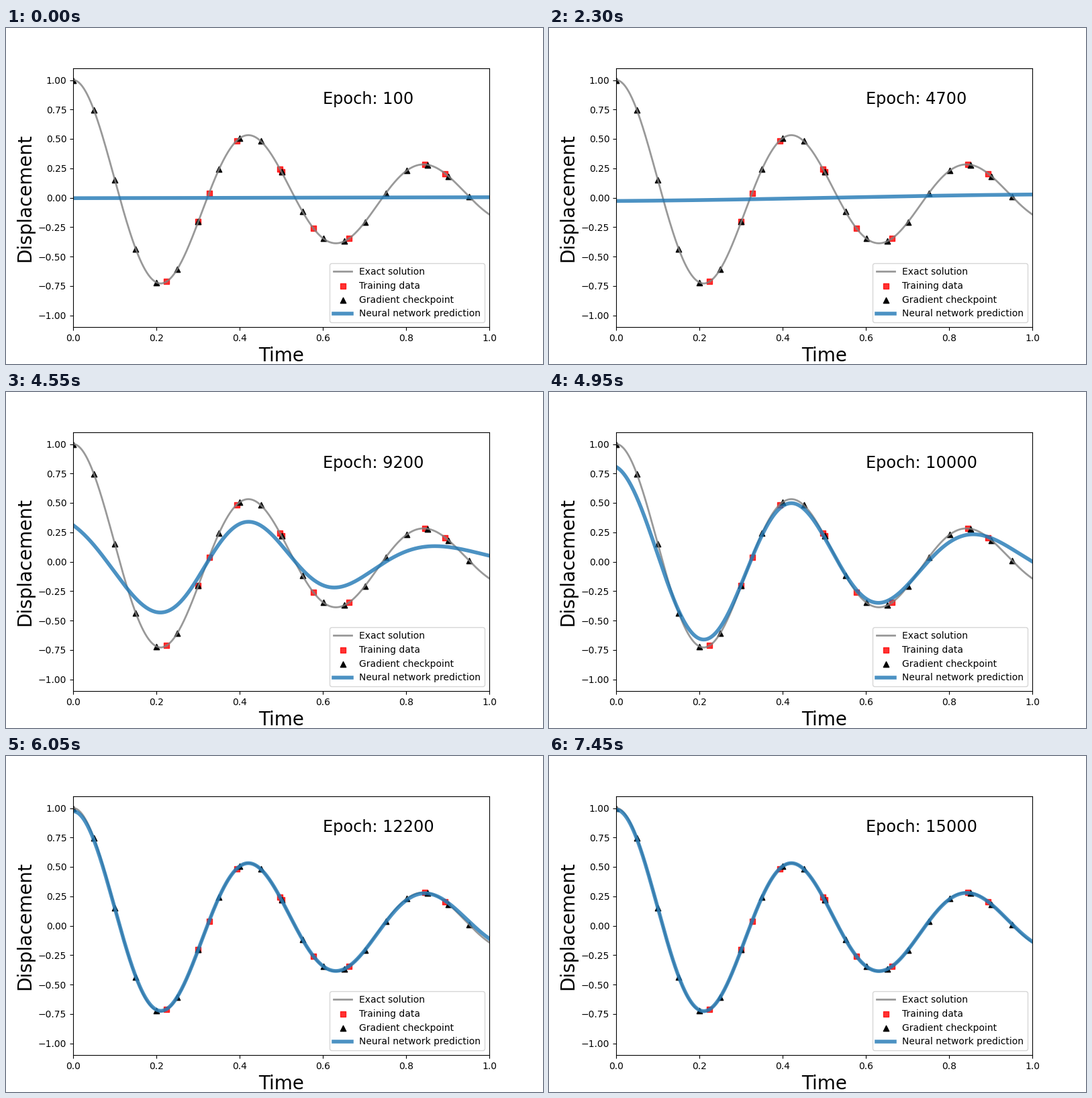
A matplotlib script that plays this animation: 800x500 px, repeating every 8000 ms.

```python
import numpy as np
import matplotlib.pyplot as plt
from matplotlib.animation import FuncAnimation

FRAMES, INTERVAL = 160, 50
LAST_EPOCH = 15000
DAMPING, OMEGA0 = 1.5, 15


def oscillator(t):
    """Underdamped oscillator released from rest at 1."""
    omega = np.sqrt(OMEGA0**2 - DAMPING**2)
    phase = np.arctan(-DAMPING / omega)
    return np.exp(-DAMPING * t) * np.cos(phase + omega * t) / np.cos(phase)


x = np.linspace(0, 1, 500)
exact = oscillator(x)
left_end = np.clip(1 - x / .3, 0, 1) ** 2
right_end = np.clip((x - .6) / .4, 0, 1) ** 2


def early_fit(epoch):
    """Slightly tilted line that slowly bends into half a wave."""
    bend = min(epoch / 7400, 1) ** 4
    height = .0305 * (1 - .17 * bend) * (1 - np.exp(-epoch / 600))
    return height * np.sin((2 + 2.4 * bend) * (x - .53 + .07 * bend))


def wave_fit(epoch):
    """Oscillation learned from the middle outwards, with both ends off in phase."""
    since = max(epoch, 8600) - 9200
    lead = .055 * np.exp(-since / 600)
    lag = .08 * np.exp(-since / 1450)
    falloff = 2 * np.exp(-since / 600) + .26 * np.exp(-since / 5000)
    return (oscillator(x + lead * left_end - lag * right_end)
            / (1 + falloff * (x - .42) ** 2))


def prediction(epoch):
    learned = 1 / (1 + np.exp((8980 - epoch) / 380))
    return (1 - learned) * early_fit(epoch) + learned * wave_fit(epoch)


plt.rcParams["font.family"] = "DejaVu Sans"
fig, ax = plt.subplots(figsize=(8, 5), dpi=100)

train = [112, 150, 163, 196, 248, 250, 288, 331, 422, 446]
ax.plot(x, exact, color="grey", lw=2, alpha=.8, label="Exact solution")
ax.scatter(x[train], exact[train], color="red", marker="s", alpha=.8,
           label="Training data")
ax.scatter(x[::25], exact[::25], color="black", marker="^",
           label="Gradient checkpoint")
line, = ax.plot(x, prediction(100), color="tab:blue", lw=4, alpha=.8,
                label="Neural network prediction")
label = ax.text(.6, .8, "", fontsize="xx-large")

ax.set(xlim=(0, 1), ylim=(-1.1, 1.1))
ax.set_xlabel("Time", fontsize=20)
ax.set_ylabel("Displacement", fontsize=20)
ax.legend(loc="lower right")


def update(i):
    epoch = min(100 * (i + 1), LAST_EPOCH)
    line.set_ydata(prediction(epoch))
    label.set_text(f"Epoch: {epoch}")
    return line, label


anim = FuncAnimation(fig, update, frames=FRAMES, interval=INTERVAL,
                     repeat=True, repeat_delay=0)
plt.show()
```
